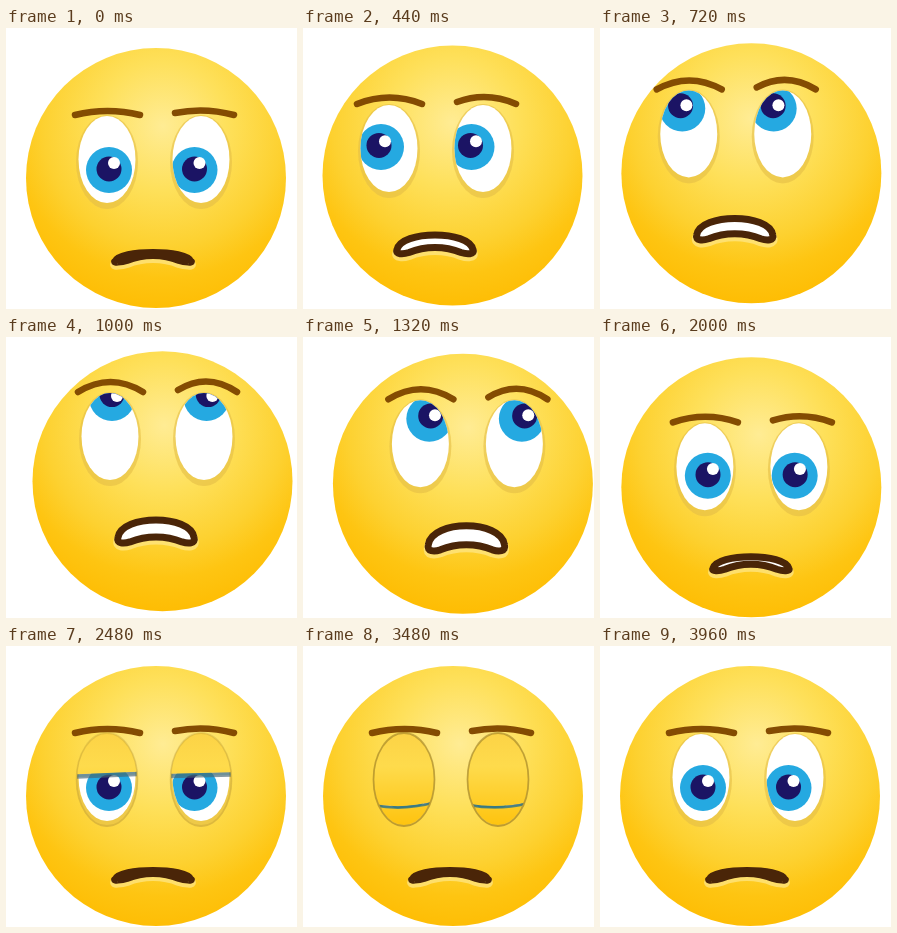
An HTML page with a canvas for the animation above (4160 ms loop, 291x281 px).

```html
<!DOCTYPE html>
<html>
<head>
<meta charset="utf-8">
<title>Rolling eyes</title>
<style>
html, body { margin: 0; width: 100%; height: 100%; overflow: hidden; background: #fff; }
canvas { display: block; }
</style>
</head>
<body>
<canvas id="stage" width="291" height="281"></canvas>
<script>
const ctx = document.getElementById('stage').getContext('2d');
const LOOP = 4160, STEP = 40;

// time, face x/y, features x/y, gaze: left x, y, right x, mouth opening, brow arch
const POSE = [
  [120, 0, 0, 0, 0, 0, 0, 0, 0, 0],
  [440, -.5, -2.5, -15, -11, -10, -12, -5, .55, .4],
  [600, 0, -4.2, -15, -21, -10, -27, -5, .65, .7],
  [1000, 6.5, -5.7, 3, -32, 0, -49, 9, .8, 1],
  [1280, 10, -3.5, 16, -26, 7, -38, 14, .9, 1],
  [1640, 6, 0, 18, -10, 4, -10, 12, 1, 1],
  [1760, 4.4, .5, 13, -6, 3, -6, 8, .8, .8],
  [2200, 0, 0, 0, 0, 0, 0, 0, 0, 0]
];
// time, upper lid edge, lower lid edge, upper lid sag
const LIDS = [
  [2040, 82, 192, 0], [2160, 100, 192, 0], [2320, 122, 192, 0], [2480, 127, 192, 0],
  [3200, 127, 192, 0], [3480, 156, 158, 4], [3560, 158, 158, 5],
  [3720, 119, 178, 0], [3960, 82, 192, 0]
];

// Smooth interpolation through the keys without overshoot
function sample(keys, t) {
  const last = keys.length - 1;
  if (t <= keys[0][0]) return keys[0].slice(1);
  if (t >= keys[last][0]) return keys[last].slice(1);
  const i = keys.findIndex(k => k[0] > t) - 1;
  const h = keys[i + 1][0] - keys[i][0], s = (t - keys[i][0]) / h;
  const slope = (n, c) => (keys[n + 1][c] - keys[n][c]) / (keys[n + 1][0] - keys[n][0]);
  const tangent = (n, c) => {
    if (n === 0 || n === last) return 0;
    const a = slope(n - 1, c), b = slope(n, c);
    return a * b > 0 ? 2 * a * b / (a + b) : 0;
  };
  return keys[i].slice(1).map((v, n) => {
    const c = n + 1, d = keys[i + 1][c] - v;
    return v + d * s * s * (3 - 2 * s)
      + h * s * (1 - s) * ((1 - s) * tangent(i, c) - s * tangent(i + 1, c));
  });
}

function ellipse(x, y, rx, ry, fill) {
  ctx.beginPath();
  ctx.ellipse(x, y, rx, ry, 0, 0, 7);
  if (fill) { ctx.fillStyle = fill; ctx.fill(); }
}

function drawFace(x, y, dx, dy) {
  const gx = 157 + dx * .5, gy = 98 + dy * .3;
  const skin = ctx.createRadialGradient(gx, gy, 0, gx, gy, 185);
  skin.addColorStop(0, '#ffec94');
  skin.addColorStop(.35, '#fee05a');
  skin.addColorStop(.65, '#fdd130');
  skin.addColorStop(.82, '#fec512');
  skin.addColorStop(1, '#febd04');
  ellipse(150 + x, 150 + y, 130, 130, skin);
}

function drawEye(cx, irisX, gazeX, gazeY, [upper, lower, sag], tilt) {
  ellipse(cx, 134, 31, 47, 'rgba(228,190,70,.6)');
  ctx.save();
  ellipse(cx, 131.5, 28.5, 43.5, '#fff');
  ctx.clip();
  const x = irisX + gazeX, y = 142 + gazeY;
  ellipse(x, y, 23, 23, '#25a9e1');
  ellipse(x + gazeX * .2, y - 1 + gazeY * .05, 12.5, 12.5, '#1b1464');
  ellipse(x + 5 + gazeX * .1, y - 7 - gazeY * .1, 6, 6, '#fff');
  ctx.restore();
  if (upper > 83) drawLids(cx, upper, lower, sag, tilt);
}

function drawLids(cx, upper, lower, sag, tilt) {
  const edge = (y, bend) => {
    ctx.beginPath();
    ctx.moveTo(cx - 33, y + tilt);
    ctx.quadraticCurveTo(cx, y + bend * 2, cx + 33, y - tilt);
  };
  const close = y => { ctx.lineTo(cx + 33, y); ctx.lineTo(cx - 33, y); ctx.fill(); };
  const closed = Math.max(0, Math.min(1, (upper - 127) / 30));
  const lid = ctx.createLinearGradient(0, 88, 0, 180);
  lid.addColorStop(0, '#fcd346');
  lid.addColorStop(.35, '#fedb4c');
  lid.addColorStop(1, '#fec30e');
  ctx.save();
  ellipse(cx, 133, 30, 46);
  ctx.clip();
  edge(upper + 2, sag);
  ctx.strokeStyle = 'rgba(70,100,115,.65)';
  ctx.lineWidth = 5;
  ctx.stroke();
  ctx.fillStyle = lid;
  edge(upper, sag);
  close(70);
  edge(lower, 4);
  close(200);
  edge(upper + 1.5, sag);
  ctx.strokeStyle = `rgba(55,120,125,${.3 + .5 * closed})`;
  ctx.lineWidth = 2.5;
  ctx.stroke();
  ctx.restore();
  ellipse(cx, 133.5, 30.5, 46.5);
  ctx.strokeStyle = `rgba(150,120,30,${.2 + .35 * closed})`;
  ctx.lineWidth = 1.8;
  ctx.stroke();
}

function drawBrow(x1, y1, x2, y2, arch) {
  ctx.beginPath();
  ctx.moveTo(x1, y1);
  ctx.quadraticCurveTo((x1 + x2) / 2, 79 - arch * 12, x2, y2);
  ctx.strokeStyle = '#844c02';
  ctx.lineWidth = 6.5;
  ctx.stroke();
}

function drawMouth(open) {
  const mix = (a, b) => a + (b - a) * open;
  const end = mix(4.5, 6), drop = end + mix(1, 8);
  const top = (mix(-4.5, -13.5) - end / 4) / .75;
  const low = drop - 2, mid = (mix(-1.5, 7) - low / 4) / .75;
  const lips = new Path2D(`M-38,${end} C-34,${top} 34,${top} 38,${end}
    C40,${drop} 32,${drop} 26,${low} C10,${mid} -10,${mid} -26,${low}
    C-32,${drop} -40,${drop} -38,${end}Z`);
  ctx.save();
  ctx.translate(147, 229 - 3 * open);
  ctx.save();
  ctx.translate(0, 3);
  ctx.strokeStyle = 'rgba(255,232,140,.7)';
  ctx.lineWidth = 9;
  ctx.stroke(lips);
  ctx.restore();
  ctx.fillStyle = '#fff';
  ctx.fill(lips);
  ctx.strokeStyle = '#4a2508';
  ctx.lineWidth = 7;
  ctx.stroke(lips);
  ctx.restore();
}

function draw(t) {
  const [faceX, faceY, x, y, leftX, gazeY, rightX, open, arch] = sample(POSE, t);
  const lids = sample(LIDS, t);
  ctx.fillStyle = '#fff';
  ctx.fillRect(0, 0, 291, 281);
  ctx.lineCap = ctx.lineJoin = 'round';
  drawFace(faceX, faceY, x, y);
  ctx.save();
  ctx.translate(x, y);
  drawEye(101, 103, leftX, gazeY, lids, 1.5);
  drawEye(195, 188.5, rightX, gazeY, lids, .8);
  drawBrow(69, 87, 134, 87, arch);
  drawBrow(169, 85, 228, 87, arch);
  drawMouth(open);
  ctx.restore();
}

const start = performance.now();
function tick() {
  const t = (performance.now() - start) % LOOP;
  draw(Math.floor(t / STEP) * STEP);
  requestAnimationFrame(tick);
}
tick();
</script>
</body>
</html>
```
